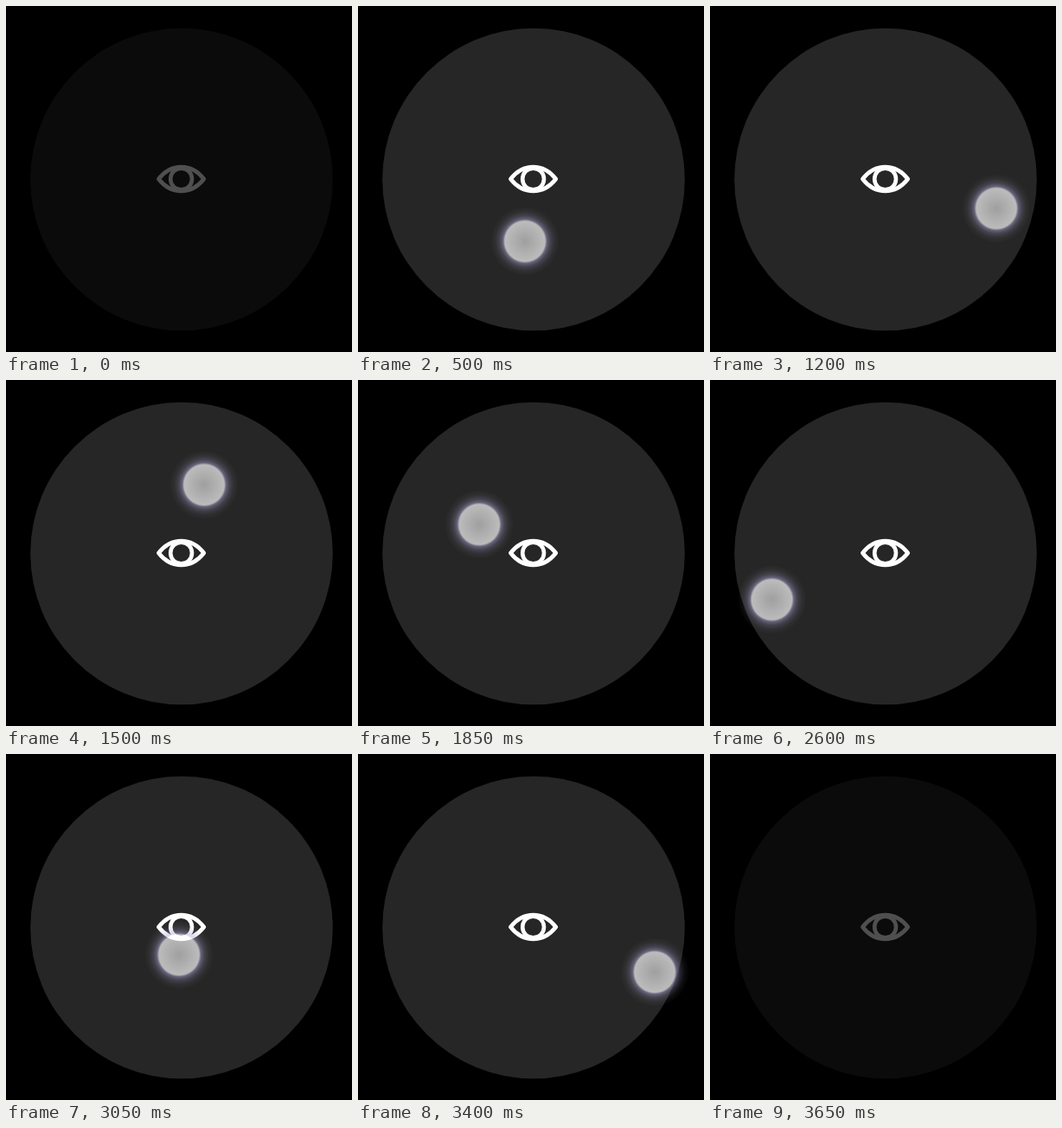
An HTML page for the animation above (4.1 s loop, 400 by 400 pixels).

```html
<!DOCTYPE html>
<html lang="en">
<head>
<meta charset="utf-8">
<title>Touch and eye</title>
<style>
  html, body { margin: 0; width: 100%; height: 100%; overflow: hidden; background: #000; }
  svg { display: block; width: 100%; height: 100%; }
</style>
</head>
<body>
<svg viewBox="0 0 400 400">
  <defs>
    <radialGradient id="glow" gradientUnits="userSpaceOnUse" cx="0" cy="0" r="40">
      <stop offset="0" stop-color="#fff" stop-opacity=".56"/>
      <stop offset=".58" stop-color="#fff" stop-opacity=".69"/>
      <stop offset=".64" stop-color="#b0a6d8" stop-opacity=".46"/>
      <stop offset=".74" stop-color="#a49cc8" stop-opacity=".23"/>
      <stop offset=".86" stop-color="#a09ab8" stop-opacity=".08"/>
      <stop offset="1" stop-color="#a09ab8" stop-opacity="0"/>
    </radialGradient>
  </defs>
  <rect width="400" height="400"/>
  <g id="pad">
    <circle cx="203" cy="200.5" r="174.8" fill="#262626"/>
    <g fill="none" stroke="#fff" stroke-linejoin="round" transform="translate(202.6 200)">
      <path stroke-width="4.6" d="M-26.2 0C-19 -9.2 -10 -13.9 0 -13.9S19 -9.2 26.2 0C19 9.2 10 13.9 0 13.9S-19 9.2 -26.2 0Z"/>
      <circle r="12.4" stroke-width="4.6"/>
    </g>
  </g>
  <circle id="touch" r="40" fill="url(#glow)"/>
</svg>
<script>
  const LOOP = 4100, STEP = 50, PRESS = 500, RELEASE = 3650, SWEEP = 2265;

  // [time, position]: rests, turning points and a few points between
  const xKeys = [[500, 193], [1000, 338], [1050, 338], [1200, 331], [1810, 135],
                 [SWEEP, 372], [2650, 57], [2700, 57], [3400, 343], [3650, 330]];
  const yKeys = [[500, 272], [1000, 238.5], [1050, 238.5], [1200, 234],
                 [1450, 120], [1850, 167], [SWEEP, 262]];

  // Smooth curve through the keys, flat at every turning point.
  function curve(keys) {
    const last = keys.length - 1;
    const slope = i => (keys[i + 1][1] - keys[i][1]) / (keys[i + 1][0] - keys[i][0]);
    const tangent = i => {
      if (i === 0 || i === last) return 0;
      const a = slope(i - 1), b = slope(i);
      return a * b <= 0 ? 0 : 2 * a * b / (a + b);
    };
    return t => {
      let i = 0;
      while (i < last - 1 && t >= keys[i + 1][0]) i++;
      const [[t0, p], [t1, q]] = [keys[i], keys[i + 1]];
      const d = t1 - t0, u = (t - t0) / d, v = 1 - u;
      return p * (1 + 2 * u) * v * v + q * (1 + 2 * v) * u * u
           + d * u * v * (tangent(i) * v - tangent(i + 1) * u);
    };
  }

  const xAt = curve(xKeys), yAt = curve(yKeys);
  // Late side-to-side sweeps follow one shallow arc.
  const arc = x => 232 + 0.00114 * (x - 210) ** 2;

  const pad = document.getElementById('pad');
  const touch = document.getElementById('touch');

  function draw(t) {
    const down = t >= PRESS && t < RELEASE;
    pad.setAttribute('opacity', down ? 1 : 0.31);
    touch.setAttribute('visibility', down ? 'visible' : 'hidden');
    if (!down) return;
    const x = xAt(t), y = t < SWEEP ? yAt(t) : arc(x);
    touch.setAttribute('transform', `translate(${x} ${y})`);
  }

  const start = performance.now();
  function tick() {
    const t = (performance.now() - start) % LOOP;
    draw(Math.floor(t / STEP) * STEP);
    requestAnimationFrame(tick);
  }
  draw(0);
  requestAnimationFrame(tick);
</script>
</body>
</html>
```
